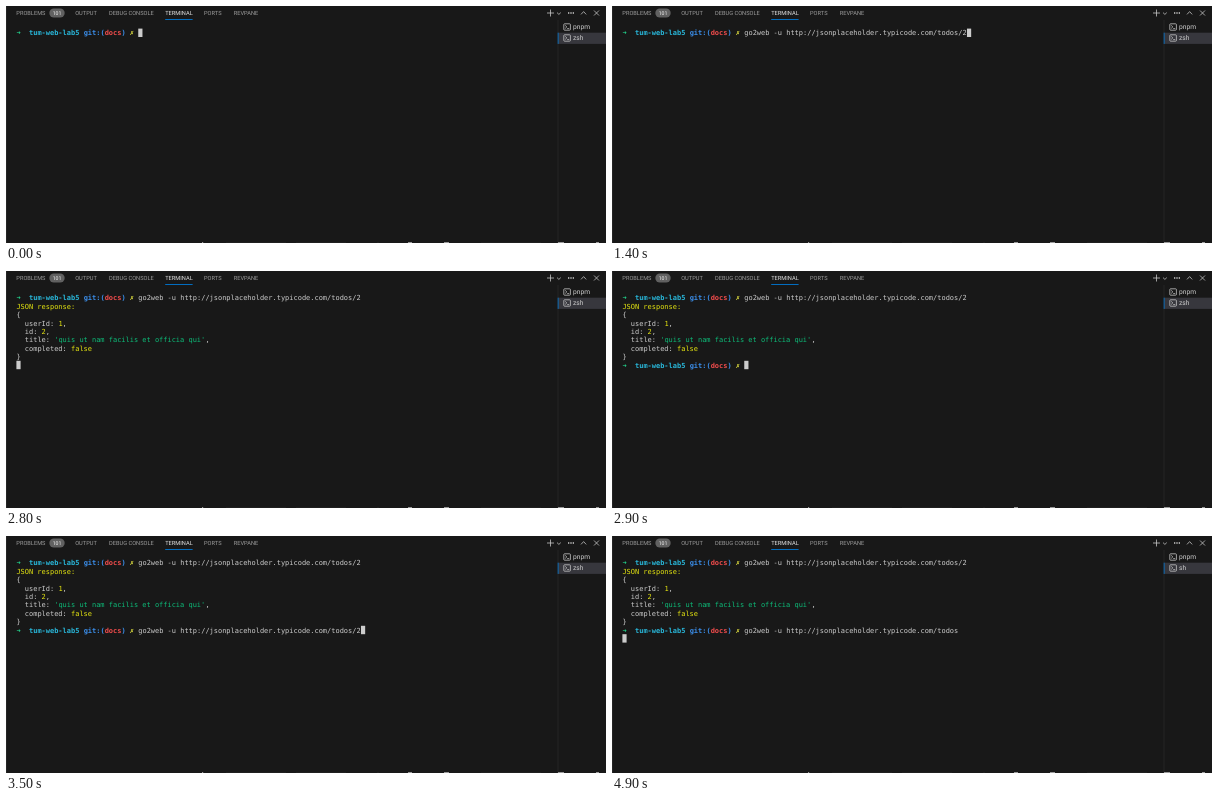
Write an HTML page that moves like this. It is 600 px wide and 237 px high and loops after 5000 ms.

```html
<!DOCTYPE html>
<html lang="en">
<head>
<meta charset="utf-8">
<title>Terminal session</title>
<style>
  html, body { margin: 0; width: 100%; height: 100%; overflow: hidden; background: #181818; }
  svg { display: block; width: 600px; height: 237px; }
  text { white-space: pre; text-rendering: geometricPrecision; }
  .tabs { font: 5.7px Roboto, sans-serif; fill: #9d9d9d; }
  .list { font: 6.7px Roboto, sans-serif; fill: #ccc; }
  .icons { fill: none; stroke: #ccc; stroke-width: .75; }
  #screen { font: 6.98px "DejaVu Sans Mono", monospace; fill: #ccc; }
  .b { font-weight: bold; }
</style>
</head>
<body>
<svg viewBox="0 0 600 237">
  <rect width="600" height="237" fill="#181818"/>
  <path d="M.5 0V237M552 14V237" stroke="#2b2b2b" stroke-width=".7"/>
  <rect x="552" y="26.7" width="48" height="11.2" fill="#37373d"/>
  <rect x="551.7" y="26.7" width=".8" height="11.2" fill="#0078d4"/>

  <g class="tabs">
    <text x="10.3" y="9.3">PROBLEMS</text>
    <rect x="43.3" y="2.4" width="15.4" height="9.2" rx="4.6" fill="#616161"/>
    <text x="51" y="9" text-anchor="middle" font-size="5.2" style="fill:#f8f8f8">101</text>
    <text x="69.2" y="9.3">OUTPUT</text>
    <text x="103" y="9.3">DEBUG CONSOLE</text>
    <text x="159.2" y="9.3" style="fill:#e7e7e7">TERMINAL</text>
    <text x="198" y="9.3">PORTS</text>
    <text x="227.7" y="9.3">REVPANE</text>
    <rect x="159.2" y="13" width="27.4" height=".9" fill="#0078d4"/>
  </g>

  <g class="icons">
    <path d="M541 7h7M544.5 3.5v7M551 6.6l1.9 1.8 1.9-1.8M575 8.4l2.6-2.8 2.6 2.8M588 4.5l5 5M593 4.5l-5 5"/>
    <path d="M562 7h6" stroke-width="1.3" stroke-dasharray="1.3 1.05"/>
    <g id="shell">
      <rect x="557.8" y="17.8" width="6.6" height="6.4" rx=".8"/>
      <path d="M559.2 19.4l1.6 1.5-1.6 1.5M561.2 22.6h2"/>
    </g>
    <use href="#shell" y="11"/>
  </g>
  <g class="list">
    <text x="567" y="23.2">pnpm</text>
    <text x="567" y="34.3" id="label">zsh</text>
  </g>

  <path d="M196 236.5h1.2M402 236.5h4M438 236.5h5M552 236.5h6M590 236.5h3" stroke="#999" stroke-width="1"/>
  <path d="M220 236.6h60M290 236.6h50M371 236.6h2M475 236.6h60" stroke="#242424" stroke-width=".8"/>

  <g id="screen"></g>
</svg>
<script>
const LEFT = 10.4, TOP = 29.3, COL = 4.202, ROW = 8.4;
const GREEN = '#23d18b', CYAN = '#29b8db', BLUE = '#3b8eea', RED = '#f14c4c',
      YELLOW = '#e5e510', STRING = '#0dbc79', PLAIN = '#ccc';
const screenEl = document.getElementById('screen');
const label = document.getElementById('label');

// A line is a list of [column, text, colour, class].
const prompt = cmd => [
  [0, '➜', GREEN, 'b'], [3, 'tum-web-lab5', CYAN, 'b'], [16, 'git:(', BLUE, 'b'],
  [21, 'docs', RED, 'b'], [25, ')', BLUE, 'b'], [27, '✗', '#f5f543', 'b'], [29, cmd, PLAIN]
];
const field = (name, value, color, comma = ',') => [
  [2, name + ':', PLAIN],
  [4 + name.length, value, color],
  [4 + name.length + value.length, comma, PLAIN]
];

const list = 'go2web -u http://jsonplaceholder.typicode.com/todos';
const item = list + '/2';
const reply = [
  prompt(item),
  [[0, 'JSON response:', YELLOW]],
  [[0, '{', PLAIN]],
  field('userId', '1', YELLOW),
  field('id', '2', YELLOW),
  field('title', "'quis ut nam facilis et officia qui'", STRING),
  field('completed', 'false', YELLOW, ''),
  [[0, '}', PLAIN]]
];

// Each step: start time, finished lines, command at the prompt (null while running).
const steps = [
  [0, [], ''],
  [900, [], 'clear'],
  [1400, [], item],
  [2800, reply, null],
  [2900, reply, ''],
  [3500, reply, item],
  [4100, reply, list + '/'],
  [4200, reply, list],
  [4800, [...reply, prompt(list)], null]
];

const drawSpan = ([col, text, color, cls = ''], row) =>
  `<text x="${LEFT + col * COL}" y="${TOP + row * ROW}" fill="${color}" class="${cls}">${text}</text>`;

function drawScreen([, done, cmd]) {
  const lines = cmd === null ? done : [...done, prompt(cmd)];
  const col = cmd === null ? 0 : 29 + cmd.length;
  const x = LEFT + col * COL, y = TOP + done.length * ROW - 6.7;
  screenEl.innerHTML =
    lines.map((line, row) => line.map(span => drawSpan(span, row)).join('')).join('') +
    `<rect x="${x}" y="${y}" width="${COL}" height="${ROW}" fill="${PLAIN}"/>`;
}

let shown;
function frame() {
  const t = performance.now() % 5000;
  const step = steps.findLast(s => s[0] <= t);
  if (step !== shown) drawScreen(shown = step);
  label.textContent = t < 4900 ? 'zsh' : 'sh';
  requestAnimationFrame(frame);
}
frame();
</script>
</body>
</html>
```
